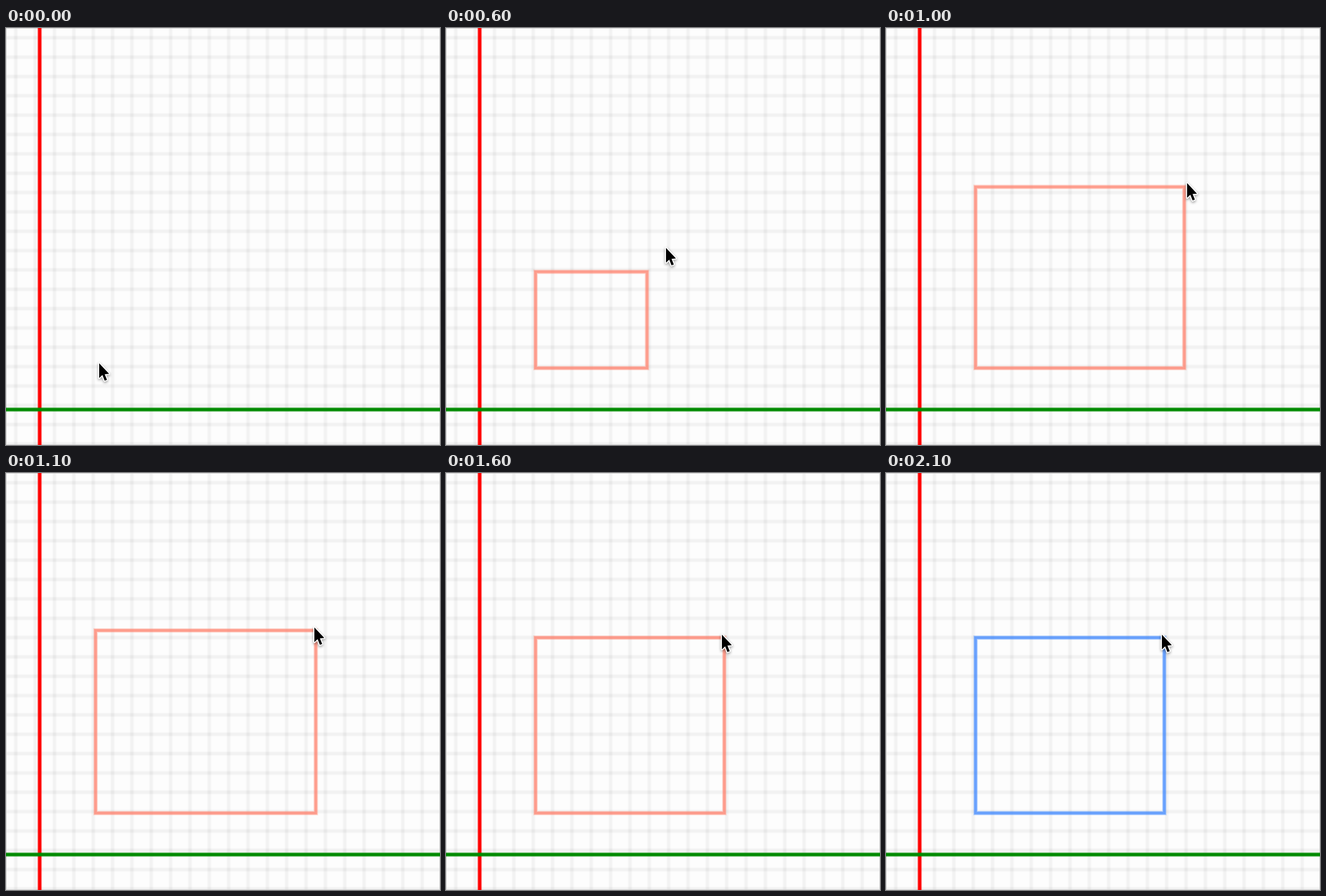
Animation of 722 by 694 pixels, one loop 2.4 s. Source, as an HTML page with a canvas:

```html
<!DOCTYPE html>
<html lang="en">
<head>
<meta charset="utf-8">
<title>Drawing a rectangle</title>
<style>
  html, body { margin: 0; width: 100%; height: 100%; overflow: hidden; background: #fdfdfd; }
  canvas { display: block; }
</style>
</head>
<body>
<canvas id="stage" width="722" height="694"></canvas>
<script>
const W = 722, H = 694, LOOP = 2400, STEP = 100;
const DRAG_START = 200, FADE_START = 1800, FADE_TIME = 300;
const ctx = document.getElementById('stage').getContext('2d');

// Key points of the pointer's path.
const path = [
  { t: 0, x: 155, y: 558 },
  { t: 400, x: 250, y: 475 },
  { t: 600, x: 366, y: 366 },
  { t: 800, x: 441, y: 280 },
  { t: 1100, x: 513, y: 257 },
  { t: 1400, x: 483, y: 265 },
  { t: 1560, x: 459, y: 269 }
];
const origin = { x: 149, y: 566 };
const salmon = [255, 128, 108], blue = [62, 136, 255];

// Soft line profiles: [width, opacity] layers, outermost first.
const gridLine = [[8, 0.012], [6, 0.014], [4, 0.015]];
const axisLine = [[8, 0.28], [6, 0.65], [4, 1]];
const edgeLine = [[8, 0.16], [6, 0.38], [4, 0.55]];

const clamp = (v, lo, hi) => Math.min(hi, Math.max(lo, v));

function softStroke(shape, color, profile) {
  ctx.strokeStyle = color;
  for (const [width, alpha] of profile) {
    ctx.globalAlpha = alpha;
    ctx.lineWidth = width;
    ctx.stroke(shape);
  }
  ctx.globalAlpha = 1;
}

const column = x => new Path2D(`M${x} 0V${H}`);
const row = y => new Path2D(`M0 ${y}H${W}`);

// Slope at a key point; zero at the ends and wherever the direction turns.
function slope(i, axis) {
  const a = path[i - 1], b = path[i], c = path[i + 1];
  if (!a || !c || (b[axis] - a[axis]) * (c[axis] - b[axis]) < 0) return 0;
  return (c[axis] - a[axis]) / (c.t - a.t);
}

function pointerAt(time) {
  const t = clamp(time, 0, path.at(-1).t);
  const i = Math.max(1, path.findIndex(k => k.t >= t));
  const a = path[i - 1], b = path[i], span = b.t - a.t;
  const s = (t - a.t) / span, r = 1 - s;
  const along = axis =>
    a[axis] * r * r * (1 + 2 * s) + b[axis] * s * s * (3 - 2 * s) +
    span * s * r * (r * slope(i - 1, axis) - s * slope(i, axis));
  return { x: along('x'), y: along('y') };
}

// The dragged corner trails the pointer and gradually catches up.
function cornerAt(t) {
  const lag = clamp(90 - (t - 400) / 7, 35, 90);
  const p = pointerAt(t - lag);
  return { x: p.x + 4, y: p.y + 5 };
}

function drawBackground() {
  ctx.fillStyle = '#fdfdfd';
  ctx.fillRect(0, 0, W, H);
  for (let p = 16.3; p < W; p += 32.19) {
    softStroke(column(p), '#000', gridLine);
    softStroke(row(p), '#000', gridLine);
  }
  ctx.strokeStyle = '#cfcfcf';
  ctx.lineWidth = 1;
  ctx.strokeRect(0.5, 0.5, W - 1, H - 1);
  softStroke(column(56), '#ff0000', axisLine);
  softStroke(row(635), '#008a00', axisLine);
}

function drawRect(t) {
  const corner = cornerAt(t);
  const mix = clamp((t - FADE_START) / FADE_TIME, 0, 1);
  const color = salmon.map((c, i) => Math.round(c + (blue[i] - c) * mix));
  const box = new Path2D();
  box.rect(origin.x, corner.y, corner.x - origin.x, origin.y - corner.y);
  softStroke(box, `rgb(${color})`, edgeLine);
}

const arrow = new Path2D('M0 0V24.5L5.4 19.5L9.2 29L13 27.5L9.2 18.2L16.5 17.6Z');

function drawPointer({ x, y }) {
  ctx.save();
  ctx.translate(x, y);
  ctx.shadowColor = 'rgba(0,0,0,0.4)';
  ctx.shadowBlur = 4;
  ctx.shadowOffsetY = 2;
  ctx.strokeStyle = '#fff';
  ctx.lineWidth = 3.4;
  ctx.lineJoin = 'round';
  ctx.stroke(arrow);
  ctx.shadowColor = 'transparent';
  ctx.fillStyle = '#000';
  ctx.fill(arrow);
  ctx.restore();
}

function draw(now) {
  const t = Math.floor(now % LOOP / STEP) * STEP;
  drawBackground();
  if (t >= DRAG_START) drawRect(t);
  drawPointer(pointerAt(t));
}

const began = performance.now();
function tick() {
  draw(performance.now() - began);
  requestAnimationFrame(tick);
}
tick();
</script>
</body>
</html>
```
